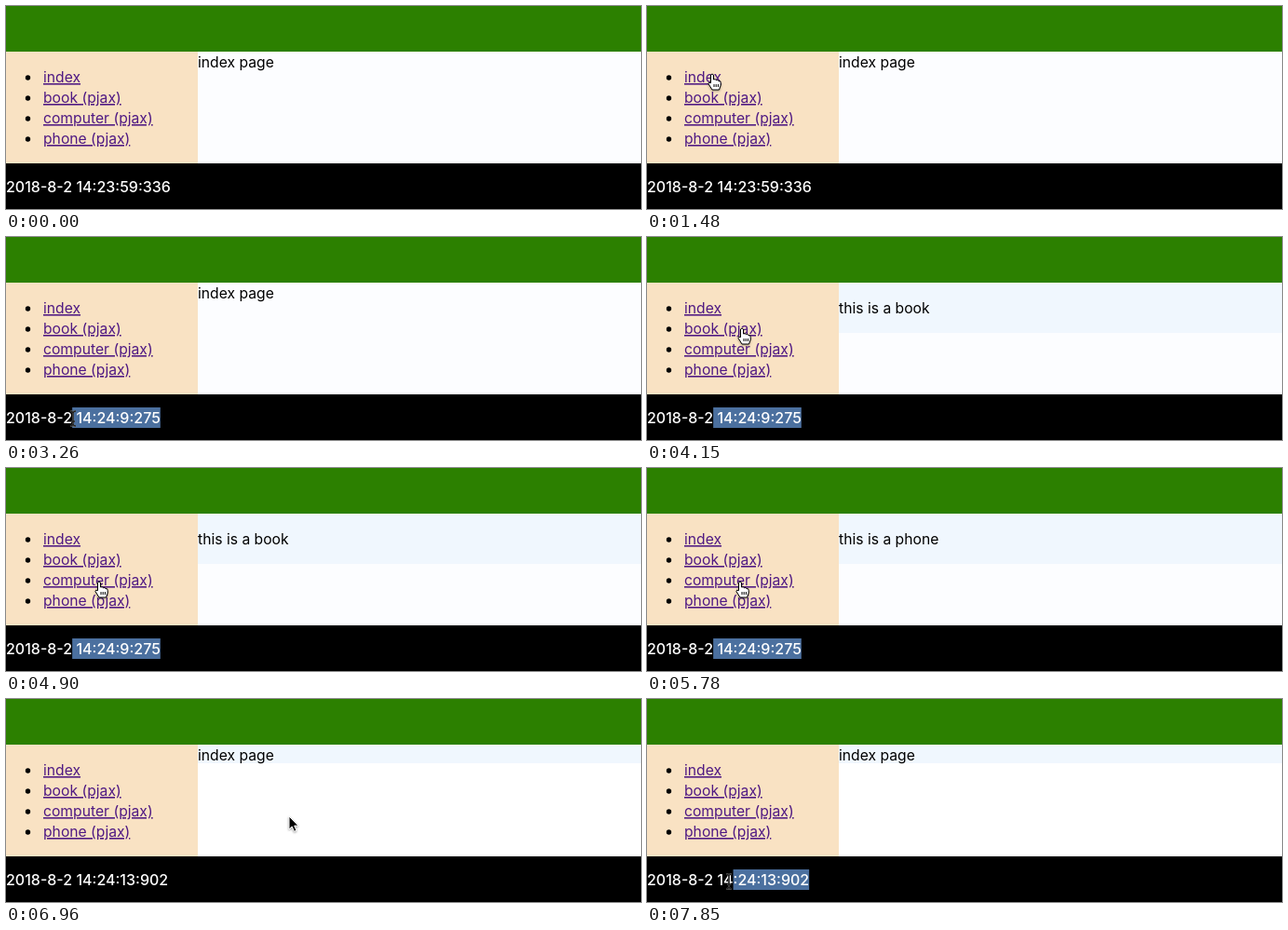
An HTML page that plays this animation: 682x218 px, repeating every 8 s.

```html
<!DOCTYPE html>
<html lang="en">
<head>
<meta charset="utf-8">
<style>
  html, body { margin: 0; width: 100%; height: 100%; overflow: hidden; }
  svg { display: block; width: 682px; height: 218px; font: 15.7px Inter, "Noto Sans", sans-serif; }
  .link { fill: #4f1983; text-decoration: underline 1px; }
  .link.active { fill: #e00; }
  #clock { font-size: 16px; font-weight: 500; fill: #fff; white-space: pre; }
  #hand { filter: drop-shadow(0 1px 1px #0005); }
  #arrow { filter: drop-shadow(0 1px 1px #0006); }
</style>
</head>
<body>
<svg viewBox="0 0 682 218">
  <rect id="page" width="682" height="218"/>
  <rect id="panel" x="206" y="49" width="476" fill="#f0f7fe"/>
  <rect width="682" height="49" fill="#2c8000"/>
  <rect y="49" width="206" height="120" fill="#f9e2c3"/>
  <rect y="169" width="682" height="49"/>
  <g id="menu"></g>
  <text id="content" x="206"></text>
  <rect id="selection" y="183" height="22" fill="#4b709f"/>
  <text id="clock" x="0" y="200"></text>
  <g id="cursor">
    <path id="arrow" d="M0 0V14L3.2 11L5.5 16.3L8 15.2L5.7 10.1H10Z" stroke="#fff"/>
    <path id="hand" d="M-1.5 1Q0-1 1.5 1V6Q3.5 5 4.3 6.7Q6 5.8 7 7.5Q9.2 7 9.2 9.5V12L7.5 17H0L-4 10.5Q-4 8.2-1.5 9.7Z M2 11v3M4.2 11v3M6.4 11v3" fill="#fff" stroke="#000"/>
    <g id="beam" fill="none">
      <path d="M-3-8Q0-8 0-6Q0-8 3-8M0-6V6M-3 8Q0 8 0 6Q0 8 3 8M-2 3H2" stroke="#666" stroke-width="2"/>
      <path d="M-3-8Q0-8 0-6Q0-8 3-8M0-6V6M-3 8Q0 8 0 6Q0 8 3 8M-2 3H2" stroke="#111"/>
    </g>
  </g>
</svg>
<script>
const LOOP = 8000, STEPS = 54;
const $ = id => document.getElementById(id);

const links = ["index", "book (pjax)", "computer (pjax)", "phone (pjax)"];
$("menu").innerHTML = links.map((label, i) => {
  const y = 82 + 22 * i;
  return `<circle cx="23.5" cy="${y - 5}" r="2.7"/><text class="link" x="40" y="${y}">${label}</text>`;
}).join("");
const linkNodes = [...document.querySelectorAll(".link")];

// Pointer hotspot: step, x, y
const path = [
  [3, 276, 133], [4, 280, 125], [5, 280, 125], [6, 278, 136], [7, 278, 136],
  [10, 70, 73], [15, 70, 73], [16, 66, 86], [19, 192, 196], [22, 72, 195], [23, 72, 195],
  [25, 102, 98], [30, 102, 98], [33, 100, 122], [35, 100, 122], [36, 100, 145],
  [38, 100, 145], [39, 100, 122], [41, 100, 122], [43, 72, 74], [45, 72, 74],
  [47, 304, 126], [50, 186, 197], [53, 88, 196]
];

// State changes; select is the first selected character
const events = [
  [0, { page: "index", clock: "2018-8-2 14:23:59:336", back: "#fcfdff" }],
  [12, { active: 0 }],
  [14, { active: -1, clock: "2018-8-2 14:24:9:275" }],
  [20, { select: 18 }], [21, { select: 13 }], [22, { select: 8 }],
  [27, { active: 1 }], [28, { active: -1, page: "book" }],
  [34, { active: 2 }], [35, { active: -1, page: "computer" }],
  [37, { active: 3 }], [38, { active: -1, page: "phone" }],
  [40, { active: 2 }], [41, { active: -1, page: "computer" }],
  [44, { active: 0 }],
  [45, { active: -1, page: "index", clock: "2018-8-2 14:24:13:902", select: null, back: "#fff" }],
  [51, { select: 18 }], [52, { select: 14 }], [53, { select: 11 }]
];

function pointerAt(step) {
  const next = path.findIndex(p => p[0] >= step);
  const b = path[next], a = path[Math.max(0, next - 1)];
  const f = b === a ? 0 : (step - a[0]) / (b[0] - a[0]);
  return [1, 2].map(i => Math.round(a[i] + (b[i] - a[i]) * f));
}

function pointerKind(x, y) {
  if (y > 183 && y < 206) return "beam";
  const overLink = linkNodes.some(node => {
    const box = node.getBBox();
    return x >= box.x && x <= box.x + box.width && y >= box.y && y <= box.y + box.height;
  });
  return overLink ? "hand" : "arrow";
}

function drawPage({ page, clock, back, active = -1, select = null }, first) {
  const isIndex = page === "index";
  $("page").setAttribute("fill", back);
  $("panel").setAttribute("height", isIndex ? 20 : 54);
  $("panel").style.display = first ? "none" : "";
  $("content").textContent = isIndex ? "index page" : "this is a " + page;
  $("content").setAttribute("y", isIndex ? 66 : 82);
  $("clock").textContent = clock;
  linkNodes.forEach((node, i) => node.classList.toggle("active", i === active));
  const selected = select !== null;
  $("selection").style.display = selected ? "" : "none";
  if (selected) {
    const start = $("clock").getSubStringLength(0, select);
    $("selection").setAttribute("x", start);
    $("selection").setAttribute("width", $("clock").getComputedTextLength() - start);
  }
}

function drawPointer(step) {
  const visible = step >= path[0][0];
  $("cursor").style.display = visible ? "" : "none";
  if (!visible) return;
  const [x, y] = pointerAt(step), kind = pointerKind(x, y);
  $("cursor").setAttribute("transform", `translate(${x} ${y})`);
  for (const id of ["arrow", "hand", "beam"]) $(id).style.display = id === kind ? "" : "none";
}

function frame() {
  // The small lead keeps steps on their rounded start times
  const time = performance.now() % LOOP + 8;
  const step = Math.min(STEPS - 1, Math.floor(time * STEPS / LOOP));
  const state = Object.assign({}, ...events.filter(e => e[0] <= step).map(e => e[1]));
  drawPage(state, step < 28);
  drawPointer(step);
  requestAnimationFrame(frame);
}
frame();
</script>
</body>
</html>
```
